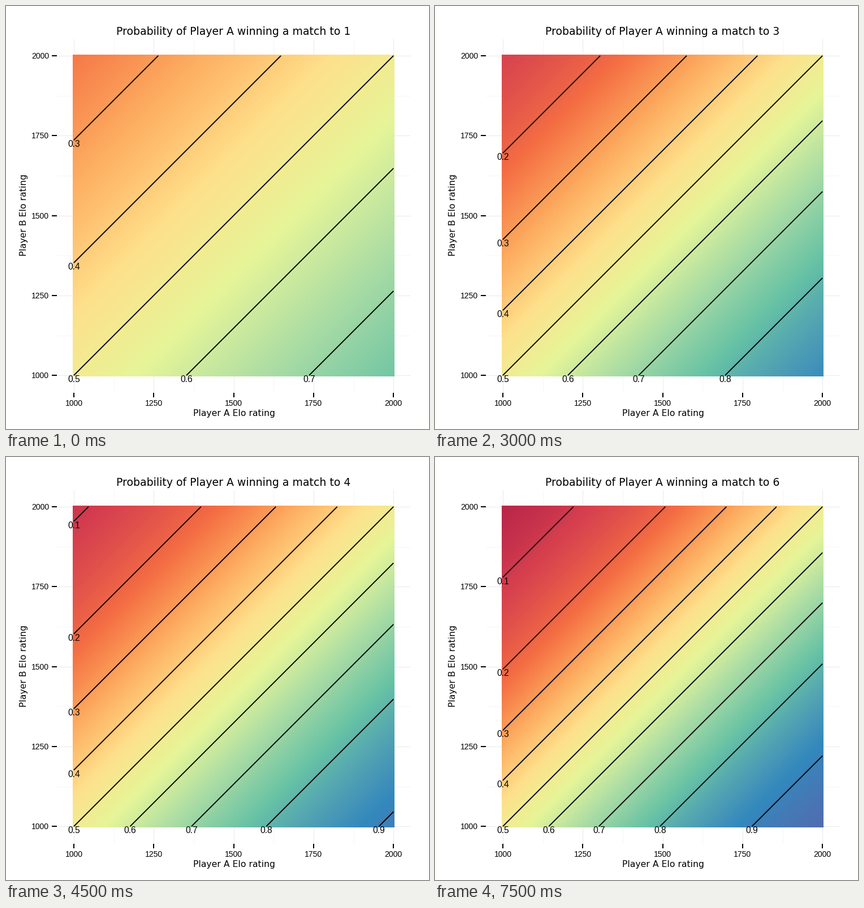
These frames come from a looping animation (748x748 px, 8000 ms). A matplotlib script:

```python
import numpy as np
import matplotlib.pyplot as plt
from matplotlib.animation import FuncAnimation
from matplotlib.colors import to_rgb

SIZE, DPI = 748, 100
SCALE = 0.5653                      # pixels per rating point
PANEL = (90, 715, 58, 683.5)        # left, right, top, bottom
STOPS = ["#9E0142", "#D53E4F", "#F46D43", "#FDAE61", "#FEE08B",
         "#E6F598", "#ABDDA4", "#66C2A5", "#3288BD", "#5E4FA2"]
TO_XYZ = np.array([[0.4124, 0.3576, 0.1805],
                   [0.2126, 0.7152, 0.0722],
                   [0.0193, 0.1192, 0.9505]])
WHITE = TO_XYZ.sum(axis=1)
LEVELS = np.arange(1, 10) / 10


def to_lab(rgb):
    lin = np.where(rgb <= 0.04045, rgb / 12.92, ((rgb + 0.055) / 1.055) ** 2.4)
    t = lin @ TO_XYZ.T / WHITE
    f = np.where(t > 0.008856, np.cbrt(t), 7.787 * t + 16 / 116)
    x, y, z = f.T
    return np.stack([116 * y - 16, 500 * (x - y), 200 * (y - z)], axis=1)


def to_srgb(lab):
    y = (lab[:, 0] + 16) / 116
    f = np.stack([y + lab[:, 1] / 500, y, y - lab[:, 2] / 200], axis=1)
    xyz = np.where(f > 0.2069, f ** 3, (f - 16 / 116) / 7.787) * WHITE
    lin = np.clip(xyz @ np.linalg.inv(TO_XYZ).T, 0, 1)
    rgb = np.where(lin <= 0.0031308, lin * 12.92,
                   1.055 * lin ** (1 / 2.4) - 0.055)
    return np.clip(rgb, 0, 1)


def make_ramp(count=1024):
    lab = to_lab(np.array([to_rgb(c) for c in STOPS]))
    t = np.linspace(0, 1, count)
    knots = np.linspace(0, 1, len(STOPS))
    return to_srgb(np.stack([np.interp(t, knots, ch) for ch in lab.T], axis=1))


RAMP = make_ramp()
ratings = np.arange(1000, 2001, 5)
diff = ratings[None, :] - ratings[::-1, None]


def px(rating):
    return 119.9 + (rating - 1000) * SCALE


def py(rating):
    return 653.2 - (rating - 1000) * SCALE


def win_chance(gap, length):
    return 1 / (1 + 10 ** (-gap * np.sqrt(length) / 2000))


def heat(length):
    p = win_chance(diff, length)
    return RAMP[np.rint(p * (len(RAMP) - 1)).astype(int)]


fig = plt.figure(figsize=(SIZE / DPI, SIZE / DPI), dpi=DPI, facecolor="white")
ax = fig.add_axes([0, 0, 1, 1])
ax.set_xlim(0, SIZE)
ax.set_ylim(SIZE, 0)
ax.axis("off")


def pt(pixels):
    return pixels * 72 / DPI


def line(xs, ys, color, width, z):
    return ax.plot(xs, ys, color=color, lw=pt(width), zorder=z,
                   solid_capstyle="butt")[0]


def text(x, y, s, size, font, ha="center", **kw):
    return ax.text(x, y, s, fontsize=pt(size), family=font, ha=ha,
                   va="baseline", color="black", zorder=5, **kw)


left, right, top, bottom = PANEL
for r in range(1125, 2000, 250):
    line([px(r)] * 2, [top, bottom], "#f5f5f5", 1, 0)
    line([left, right], [py(r)] * 2, "#f5f5f5", 1, 0)
for r in range(1000, 2001, 250):
    line([px(r)] * 2, [top, bottom], "#e9e9e9", 1, 1)
    line([left, right], [py(r)] * 2, "#e9e9e9", 1, 1)
    line([px(r)] * 2, [bottom, bottom + 8.5], "black", 2, 2)
    line([left - 9, left], [py(r)] * 2, "black", 2, 2)
    text(px(r), 707, str(r), 14, "Liberation Sans")
    text(76, py(r) + 5, str(r), 14, "Liberation Sans", ha="right")

text(403, 725, "Player A Elo rating", 15.6, "DejaVu Sans")
text(36.5, 370, "Player B Elo rating", 15.6, "DejaVu Sans",
     rotation=90, rotation_mode="anchor")
title = text(402.5, 51, "", 18.9, "DejaVu Sans")

field = ax.imshow(heat(1), extent=(px(997.5), px(2002.5), py(997.5), py(2002.5)),
                  interpolation="nearest", aspect="auto", zorder=3)
ax.set_xlim(0, SIZE)
ax.set_ylim(SIZE, 0)
contours = [line([], [], "black", 1.9, 4) for _ in LEVELS]
labels = [text(0, 0, f"{p:.1f}", 15.6, "Liberation Sans") for p in LEVELS]


def update(i):
    length = i // 3 + 1
    title.set_text(f"Probability of Player A winning a match to {length}")
    field.set_data(heat(length))
    for p, curve, label in zip(LEVELS, contours, labels):
        gap = 2000 * np.log10(p / (1 - p)) / np.sqrt(length)
        shown = abs(gap) < 1000
        curve.set_visible(shown)
        label.set_visible(shown)
        a = np.array([1000 + max(gap, 0), 2000 + min(gap, 0)])
        b = a - gap
        curve.set_data(px(a), py(b))
        label.set_position((px(a[0]), py(b[0]) + 12))
    return [title, field, *contours, *labels]


anim = FuncAnimation(fig, update, frames=16, interval=500,
                     repeat=True, repeat_delay=0, blit=False)
plt.show()
```
